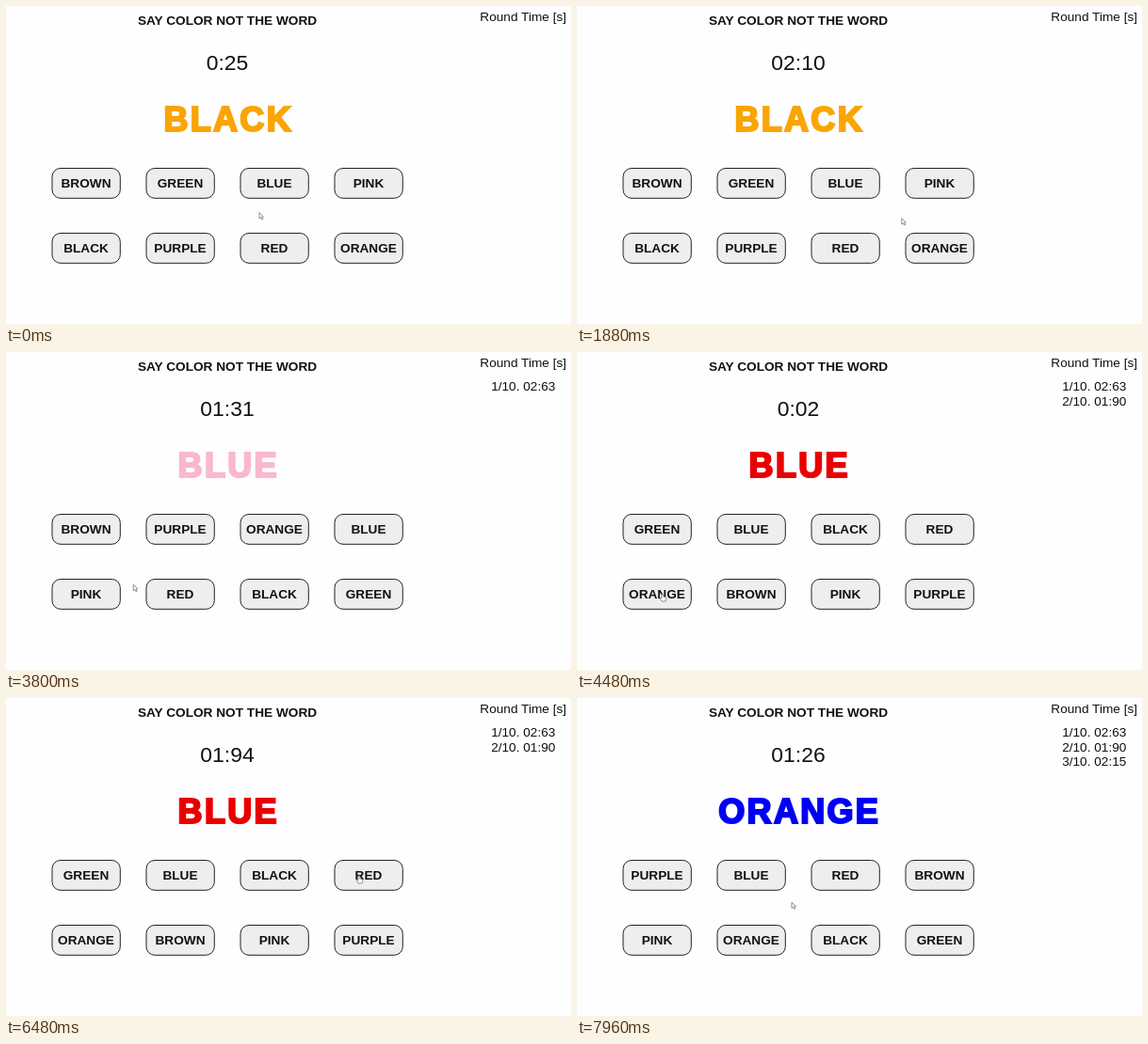
An HTML page for the animation above (8000 ms loop, 600x338 px).

```html
<!DOCTYPE html>
<html lang="en">
<head>
<meta charset="utf-8">
<title>Say color not the word</title>
<style>
  html, body { margin: 0; width: 100%; height: 100%; overflow: hidden; background: #fefdff; }
  svg { display: block; width: 100%; height: 100%; }
  text { font: 13.65px "Liberation Sans", Arial, sans-serif; text-anchor: middle; fill: #111; white-space: pre; }
  .bold { font-weight: bold; }
  #timer { font-size: 22.9px; }
  #word {
    font-size: 36px; font-weight: bold; letter-spacing: 2.3px;
    stroke-width: 2.2px; stroke-linejoin: miter;
  }
  rect { fill: #eeeeef; stroke: #222; stroke-width: 1; }
  #cursor path { fill: #fff; stroke: #777; stroke-width: .8; }
</style>
</head>
<body>
<svg viewBox="0 0 600 338">
  <text class="bold" x="235" y="20.4">SAY COLOR NOT THE WORD</text>
  <text x="549.2" y="16">Round Time [s]</text>
  <text id="timer" x="235" y="67.7"></text>
  <text id="word" x="236.2" y="133"></text>
  <g id="buttons"></g>
  <g id="log"></g>
  <g id="cursor">
    <path id="arrow" d="M.5 .5V7L2 5.7L3.2 8L4.3 7.5L3.2 5.2H5Z"/>
    <path id="hand" d="M-1 5V.5Q0 -1 .8 .5V3L3 3.5Q4 4 3.8 5.5L3 8H-.8L-3 5Q-2.5 3.5 -1 5Z"/>
  </g>
</svg>
<script>
const LOOP = 8000;
const TICKS_PER_MS = 0.0985;

// from: when the round appears; zero: when its clock reads 0
const rounds = [
  { from: 0, zero: -253, word: "BLACK", color: "#f9a505", result: "02:63",
    labels: "BROWN GREEN BLUE PINK BLACK PURPLE RED ORANGE" },
  { from: 2440, zero: 2472, word: "BLUE", color: "#fab8cc", result: "01:90",
    labels: "BROWN PURPLE ORANGE BLUE PINK RED BLACK GREEN" },
  { from: 4440, zero: 4514, word: "BLUE", color: "#e90000", result: "02:15",
    labels: "GREEN BLUE BLACK RED ORANGE BROWN PINK PURPLE" },
  { from: 6700, zero: 6681, word: "ORANGE", color: "#0000f5",
    labels: "PURPLE BLUE RED BROWN PINK ORANGE BLACK GREEN" }
];

// Pointer stops: time, x, y
const stops = [
  [0, 268.5, 219], [1700, 268.5, 219], [1880, 344.3, 225], [2120, 385, 257],
  [2480, 385, 257], [2840, 242.3, 221.5], [3440, 242.3, 221.5], [4000, 91, 257],
  [4560, 91, 257], [4920, 230, 231], [5760, 230, 231], [5880, 298, 215],
  [6200, 375, 189], [6780, 375, 189], [7240, 227.5, 216.5], [LOOP, 227.5, 216.5]
];

const byId = id => document.getElementById(id);

function add(parent, tag, attributes) {
  const node = document.createElementNS("http://www.w3.org/2000/svg", tag);
  for (const name in attributes) node.setAttribute(name, attributes[name]);
  return parent.appendChild(node);
}

const buttons = Array.from({ length: 8 }, (_, i) => {
  const x = 85 + 100 * (i % 4), y = 188.4 + 69 * Math.floor(i / 4);
  add(byId("buttons"), "rect", { x: x - 36, y: y - 15.9, width: 72.3, height: 31.8, rx: 9 });
  const label = add(byId("buttons"), "text", { x, y: y + 4.8, class: "bold" });
  return { x, y, label };
});

const logLines = rounds.slice(0, -1).map((round, i, { length }) => {
  const line = add(byId("log"), "text", { x: 549.3, y: 41 + 15.6 * i });
  line.textContent = `${i + 1}/10. ${round.result}`;
  return line;
});

function formatTime(ticks) {
  const seconds = Math.floor(ticks / 100);
  return (seconds ? "0" + seconds : "0") + ":" + String(ticks % 100).padStart(2, "0");
}

function pointerAt(t) {
  const next = stops.findIndex(stop => stop[0] > t);
  const [t0, x0, y0] = stops[next - 1], [t1, x1, y1] = stops[next];
  const p = (t - t0) / (t1 - t0), ease = p * p * (3 - 2 * p);
  return [x0 + (x1 - x0) * ease, y0 + (y1 - y0) * ease];
}

function draw(t) {
  const index = rounds.findLastIndex(round => round.from <= t);
  const round = rounds[index];
  const ticks = Math.max(2, Math.round((t - round.zero) * TICKS_PER_MS));
  byId("timer").textContent = formatTime(ticks);

  const word = byId("word");
  word.textContent = round.word;
  word.style.fill = word.style.stroke = round.color;

  const labels = round.labels.split(" ");
  buttons.forEach((button, i) => button.label.textContent = labels[i]);
  logLines.forEach((line, i) => line.style.display = i < index ? "" : "none");

  const [x, y] = pointerAt(t);
  const hovering = buttons.some(b => Math.abs(x - b.x) < 36 && Math.abs(y - b.y) < 16);
  byId("cursor").setAttribute("transform", `translate(${x} ${y})`);
  byId("arrow").style.display = hovering ? "none" : "";
  byId("hand").style.display = hovering ? "" : "none";
}

const start = performance.now();
function frame() {
  draw((performance.now() - start) % LOOP);
  requestAnimationFrame(frame);
}
frame();
</script>
</body>
</html>
```
